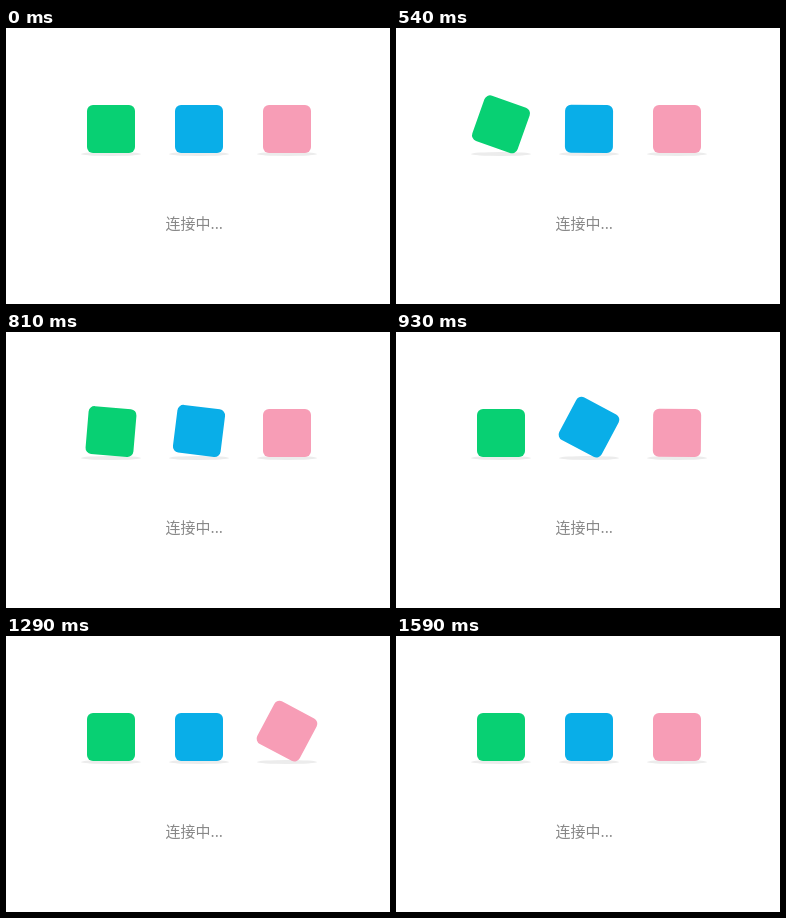
These frames come from a looping animation (384x276 px, 1.8 s). An HTML page with a canvas:

```html
<!DOCTYPE html>
<html lang="zh-CN">
<head>
<meta charset="utf-8">
<style>
  html, body { margin: 0; width: 100%; height: 100%; overflow: hidden; background: #fff; }
  canvas { display: block; }
</style>
</head>
<body>
<canvas id="stage" width="384" height="276"></canvas>
<script>
const ctx = document.getElementById('stage').getContext('2d');
const LOOP = 1800, STEP = 30, START = 150, STAGGER = 360, TURN = 720;
const SIZE = 48, RADIUS = 6, FLOOR = 125;
const boxes = [
  { x: 105, color: '#08d073' },
  { x: 193, color: '#09aee8' },
  { x: 281, color: '#f79db6' }
];

// Quarter turn: slow build-up, quick swing, small overshoot. [ms, degrees]
const keys = [
  [0, 0], [150, 1.5], [270, 5], [360, 14], [420, 28],
  [480, 56], [540, 90], [595, 99], [720, 90], [840, 90]
];

function slopeAt(i) {
  const a = keys[Math.max(i - 1, 0)];
  const b = keys[Math.min(i + 1, keys.length - 1)];
  return (b[1] - a[1]) / (b[0] - a[0]);
}

function angleAt(ms) {
  if (ms <= 0 || ms >= TURN) return 0;
  let i = 0;
  while (keys[i + 1][0] <= ms) i++;
  const [t0, a0] = keys[i], [t1, a1] = keys[i + 1];
  const d = t1 - t0, u = (ms - t0) / d, v = 1 - u;
  return a0 * v * v * (1 + 2 * u) + a1 * u * u * (3 - 2 * u)
    + d * u * v * (v * slopeAt(i) - u * slopeAt(i + 1));
}

function drawShadow(x) {
  ctx.fillStyle = '#ececec';
  ctx.beginPath();
  ctx.ellipse(x, 126, 30, 2, 0, 0, Math.PI * 2);
  ctx.fill();
}

function drawBox({ x, color }, degrees) {
  const a = degrees * Math.PI / 180;
  const spread = Math.abs(Math.cos(a)) + Math.abs(Math.sin(a));
  const reach = (SIZE / 2 - RADIUS) * spread + RADIUS;
  const dip = 0.8 * Math.sin(2 * a) ** 2;
  ctx.save();
  ctx.translate(x, FLOOR - reach + dip);
  ctx.rotate(a);
  ctx.fillStyle = color;
  ctx.beginPath();
  ctx.roundRect(-SIZE / 2, -SIZE / 2, SIZE, SIZE, RADIUS);
  ctx.fill();
  ctx.restore();
}

function draw(now) {
  const time = Math.floor((now % LOOP) / STEP) * STEP;
  ctx.fillStyle = '#fff';
  ctx.fillRect(0, 0, 384, 276);
  boxes.forEach((box, i) => {
    drawShadow(box.x);
    drawBox(box, angleAt(time - START - i * STAGGER));
  });
  ctx.fillStyle = '#888';
  ctx.font = '15px "Noto Sans CJK SC", "Noto Sans CJK", sans-serif';
  ctx.fillText('连接中...', 159.5, 201);
}

let origin;
function tick(now) {
  origin ??= now;
  draw(now - origin);
  requestAnimationFrame(tick);
}
draw(0);
requestAnimationFrame(tick);
</script>
</body>
</html>
```
